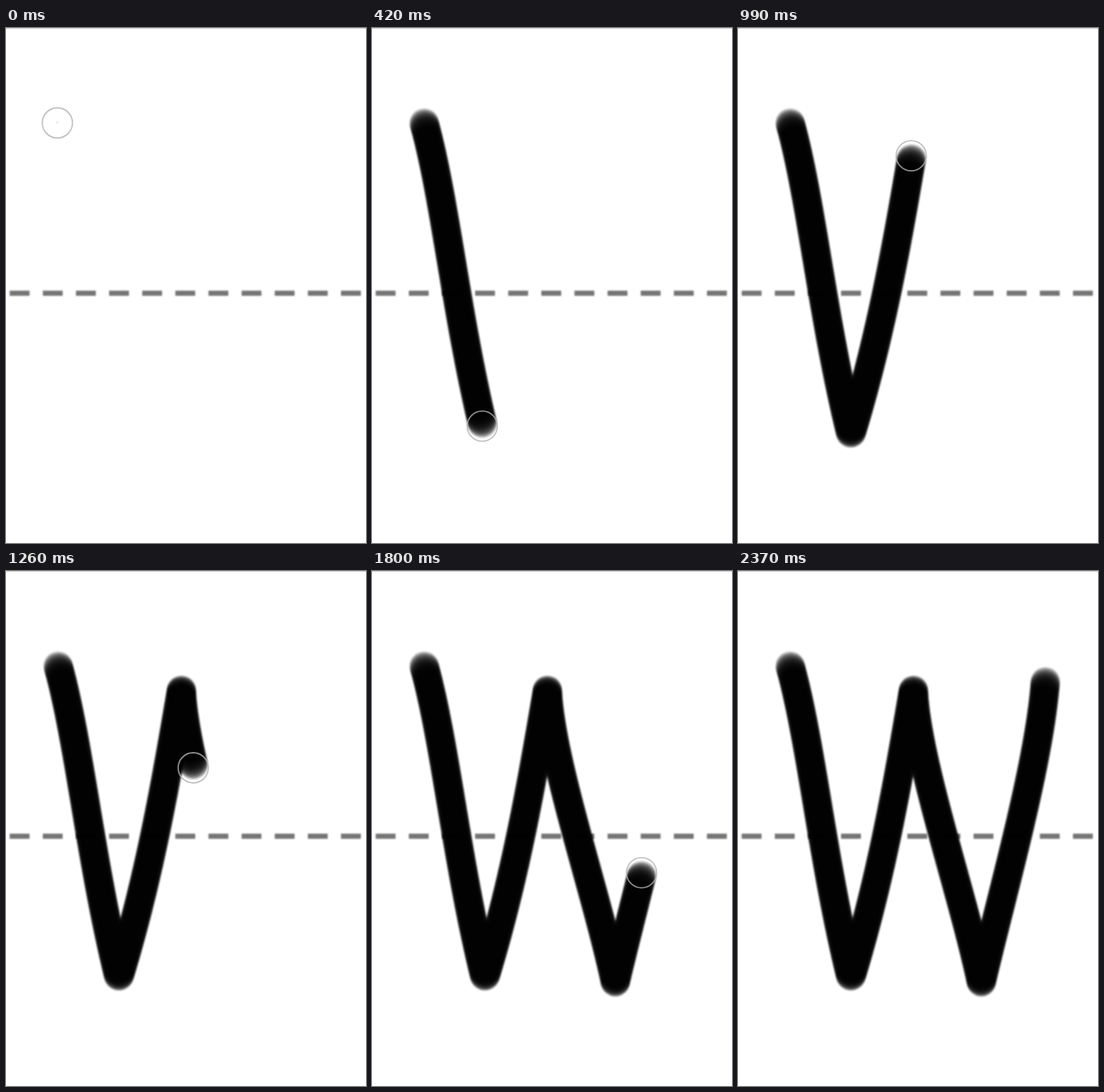
Animation of 489x700 px, one loop 7350 ms. Source, as an HTML page with a canvas:

```html
<!DOCTYPE html>
<html lang="en">
<head>
<meta charset="utf-8">
<title>Writing a W</title>
<style>
  html, body { margin: 0; width: 100%; height: 100%; overflow: hidden; background: #fff; }
  canvas { display: block; }
</style>
</head>
<body>
<canvas id="stage" width="489" height="700"></canvas>
<script>
const stage = document.getElementById('stage');
const ctx = stage.getContext('2d');
const layer = document.createElement('canvas');
layer.width = stage.width;
layer.height = stage.height;
const ink = layer.getContext('2d');

const LOOP = 7350;
const TICK = 30;
const BRUSH = 20;
const FLOW = 0.145;
const LAG = 4;
const LAST_POSE = 53;

// Pen legs: curve, first pose, length in poses, whether ink is laid down.
const legs = [
  { d: 'M70.8 129 C100 235 114 390 153 550.5', start: -1, span: 11, draws: true },
  { d: 'M153.8 550.5 C197 408 219 275 238.3 162', start: 11.7, span: 11.5, draws: true },
  { d: 'M238.3 162 C243 260 304 434 330.5 558.7', start: 24.3, span: 11, draws: true },
  { d: 'M330.5 558.7 C362 425 409 262 417.5 150', start: 36.5, span: 11, draws: true },
  { d: 'M417.5 150 Q445 108 484 105', start: 47.5, span: 5.5, draws: false }
];

// One point per pixel of curve length.
function samplePath(d) {
  const path = document.createElementNS('http://www.w3.org/2000/svg', 'path');
  path.setAttribute('d', d);
  const n = Math.round(path.getTotalLength());
  return Array.from({ length: n + 1 }, (_, i) => path.getPointAtLength(i));
}
legs.forEach(leg => { leg.points = samplePath(leg.d); });

const smooth = x => {
  x = Math.min(1, Math.max(0, x));
  return x * x * (3 - 2 * x);
};

// Poses advance every 1.438 ticks, snapped to whole ticks.
function poseAt(ms) {
  const tick = Math.floor((ms - TICK) / TICK);
  return Math.ceil((tick + 0.24) / 1.438) - 1;
}

function disc(c, x, y, r) {
  c.beginPath();
  c.arc(x, y, r, 0, Math.PI * 2);
}

function drawPaper() {
  ctx.fillStyle = '#fff';
  ctx.fillRect(0, 0, 489, 700);
  ctx.fillStyle = '#c8c8c8';
  ctx.fillRect(0, 0, 489, 1);
  ctx.fillStyle = '#757575';
  ctx.filter = 'blur(1px)';
  for (let x = 5; x < 489; x += 45) ctx.fillRect(x, 357, 27, 7);
  ctx.filter = 'none';
}

// Draws the ink so far and returns the pen position.
function drawInk(pose) {
  let pen = legs[0].points[0];
  ink.clearRect(0, 0, layer.width, layer.height);
  ink.fillStyle = `rgba(0, 0, 0, ${FLOW})`;
  for (const { points, start, span, draws } of legs) {
    const end = Math.round(smooth((pose - start) / span) * (points.length - 1));
    if (end === 0) break;
    pen = points[end];
    if (!draws) continue;
    const wet = pose < start + span ? end - LAG : end;
    for (let i = 0; i <= wet; i++) {
      disc(ink, points[i].x, points[i].y, BRUSH);
      ink.fill();
    }
  }
  ctx.filter = 'blur(0.8px)';
  ctx.drawImage(layer, 0, 0);
  ctx.filter = 'none';
  return pen;
}

function drawCursor({ x, y }) {
  ctx.strokeStyle = 'rgba(178, 178, 178, 0.8)';
  ctx.lineWidth = 1.8;
  disc(ctx, x - 1, y, 20.5);
  ctx.stroke();
  ctx.fillStyle = 'rgba(0, 0, 0, 0.1)';
  disc(ctx, x - 1.2, y - 0.8, 1.5);
  ctx.fill();
}

let shown = null;
function render(ms) {
  const pose = Math.min(poseAt(ms), LAST_POSE + 1);
  if (pose === shown) return;
  shown = pose;
  drawPaper();
  const pen = drawInk(pose);
  if (pose <= LAST_POSE) drawCursor(pen);
}

const begin = performance.now();
function frame() {
  render((performance.now() - begin) % LOOP);
  requestAnimationFrame(frame);
}
frame();
</script>
</body>
</html>
```
